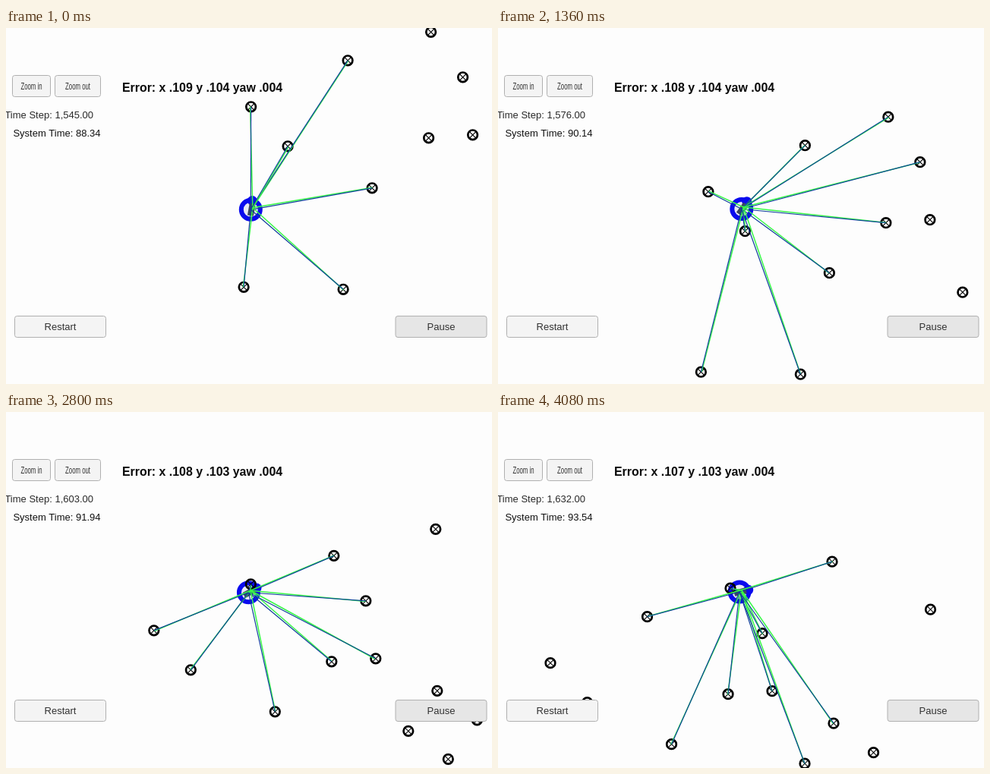
These frames come from a looping animation (640 px wide and 469 px high, 4.24 s). An HTML page with a canvas:

```html
<!DOCTYPE html>
<html lang="en">
<head>
<meta charset="utf-8">
<title>Vehicle localization</title>
<style>
  html, body { margin: 0; width: 100%; height: 100%; overflow: hidden; background: #fdfdfd; }
  canvas { display: block; }
</style>
</head>
<body>
<canvas id="stage" width="640" height="469"></canvas>
<script>
const ctx = document.getElementById('stage').getContext('2d');
const LOOP = 4240, TICK = 160, FIRST = 80, RANGE = 245;
const SANS = '"Liberation Sans", Arial, sans-serif';
const BLUE = '#0a0aee';

const landmarks = [
  [559, 5.5], [449.5, 43], [601, 65], [322, 104], [556, 145], [614, 141],
  [370.5, 156], [481.5, 211], [312.5, 341.5], [443.5, 344.5], [657, 236.5],
  [693, -29.5], [695, 183.5], [709.5, 273.5], [747.5, 222], [822.5, 33.5]
];

// The simulator runs unevenly: steps done by certain ticks.
const pace = [[0, 1545], [7, 1568], [11, 1583], [15, 1596], [18, 1603], [22, 1619], [26, 1632]];

function stepAt(tick) {
  const i = Math.max(1, pace.findIndex(p => p[0] >= tick));
  const [t0, s0] = pace[i - 1], [t1, s1] = pace[i];
  return Math.round(s0 + (s1 - s0) * (tick - t0) / (t1 - t0));
}

// Distance driven right and up, for progress p from 0 to 1.
const driveX = p => p * (55 + 206 * p - 7.4 * p ** 6);
const driveY = p => p * (378.2 - 153 * p + 137 * (p - 0.77) ** 3);

const noise = n => {
  const v = Math.sin(n * 127.1 + 3.7) * 43758.5453;
  return v - Math.floor(v) - 0.5;
};

function line(x1, y1, x2, y2, color, width) {
  ctx.beginPath();
  ctx.moveTo(x1, y1);
  ctx.lineTo(x2, y2);
  ctx.strokeStyle = color;
  ctx.lineWidth = width;
  ctx.stroke();
}

function disc(x, y, r, fill, stroke, width) {
  ctx.beginPath();
  ctx.arc(x, y, r, 0, 2 * Math.PI);
  if (fill) { ctx.fillStyle = fill; ctx.fill(); }
  if (stroke) { ctx.strokeStyle = stroke; ctx.lineWidth = width; ctx.stroke(); }
}

function label(text, x, y, font, align, color) {
  ctx.font = `${font} ${SANS}`;
  ctx.textAlign = align;
  ctx.fillStyle = color;
  ctx.fillText(text, x, y);
}

function button(text, x, y, w, h, fill, size, squeeze = 1) {
  ctx.beginPath();
  ctx.roundRect(x + 0.5, y + 0.5, w - 1, h - 1, 3);
  ctx.fillStyle = fill;
  ctx.fill();
  ctx.strokeStyle = '#b0b0b0';
  ctx.lineWidth = 1;
  ctx.stroke();
  ctx.save();
  ctx.translate(x + w / 2, y + h / 2 + size * 0.36);
  ctx.scale(squeeze, 1);
  label(text, 0, 0, size + 'px', 'center', '#323232');
  ctx.restore();
}

function drawMark(x, y) {
  disc(x, y, 6.3, null, '#000', 2.7);
  line(x - 4, y - 4, x + 4, y + 4, '#000', 1.1);
  line(x - 4, y + 4, x + 4, y - 4, '#000', 1.1);
}

function drawVehicle(x, y, heading) {
  disc(x, y, 12.5, '#e8e8f4', BLUE, 6);
  disc(x + 12 * Math.cos(heading), y - 12 * Math.sin(heading), 6.5, BLUE);
  ctx.save();
  ctx.translate(x + 1, y);
  ctx.rotate(-heading);
  ctx.fillStyle = '#3c4460';
  ctx.fillRect(-8, -4, 16, 8);
  ctx.restore();
}

function draw(tick) {
  const step = stepAt(tick);
  const p = (step - 1545) / 87, d = 0.01;
  const heading = Math.atan2(driveY(p + d) - driveY(p - d), driveX(p + d) - driveX(p - d));
  const carX = 322.3 - 4.3 * p, carY = 239.3 - 2.3 * p;
  const marks = landmarks.map(([x, y]) => [x + 0.6 - driveX(p), y - 0.2 + driveY(p)]);

  ctx.fillStyle = '#fdfdfd';
  ctx.fillRect(0, 0, 640, 469);
  drawVehicle(carX, carY, heading);
  marks.forEach(([x, y]) => drawMark(x, y));

  // Noisy measurement from the true pose, then the estimate's association.
  marks.forEach(([x, y], i) => {
    if (Math.hypot(x - carX, y - carY) > RANGE) return;
    const n = tick * 31 + i * 2;
    line(carX + 2.5, carY - 2.5, x + 2 * noise(n), y + 2 * noise(n + 1), '#38fa48', 1.5);
    line(carX, carY, x, y, '#10409c', 1.2);
  });

  button('Zoom in', 8, 62, 51, 29, '#f4f4f4', 12, 0.65);
  button('Zoom out', 64, 62, 61, 29, '#f4f4f4', 12, 0.65);
  button('Restart', 11, 379, 121, 29, '#f4f4f4', 13);
  button('Pause', 512.5, 379, 121, 29, '#e6e6e6', 13);

  const errX = Math.round(109 - 2 * p), errY = Math.round(104 - 0.8 * p);
  label(`Error: x .${errX} y .${errY} yaw .004`, 153, 84, 'bold 15.9px', 'left', '#0a0a0a');
  label(`Time Step: 1,${step - 1000}.00`, 115, 118.5, '13px', 'right', '#2a2a2a');
  label(`System Time: ${(88.34 + 0.2 * tick).toFixed(2)}`, 124.5, 142.5, '13px', 'right', '#111');
}

const start = performance.now();
function loop() {
  const t = (performance.now() - start) % LOOP;
  draw(Math.floor((t + TICK - FIRST) / TICK));
  requestAnimationFrame(loop);
}
loop();
</script>
</body>
</html>
```
